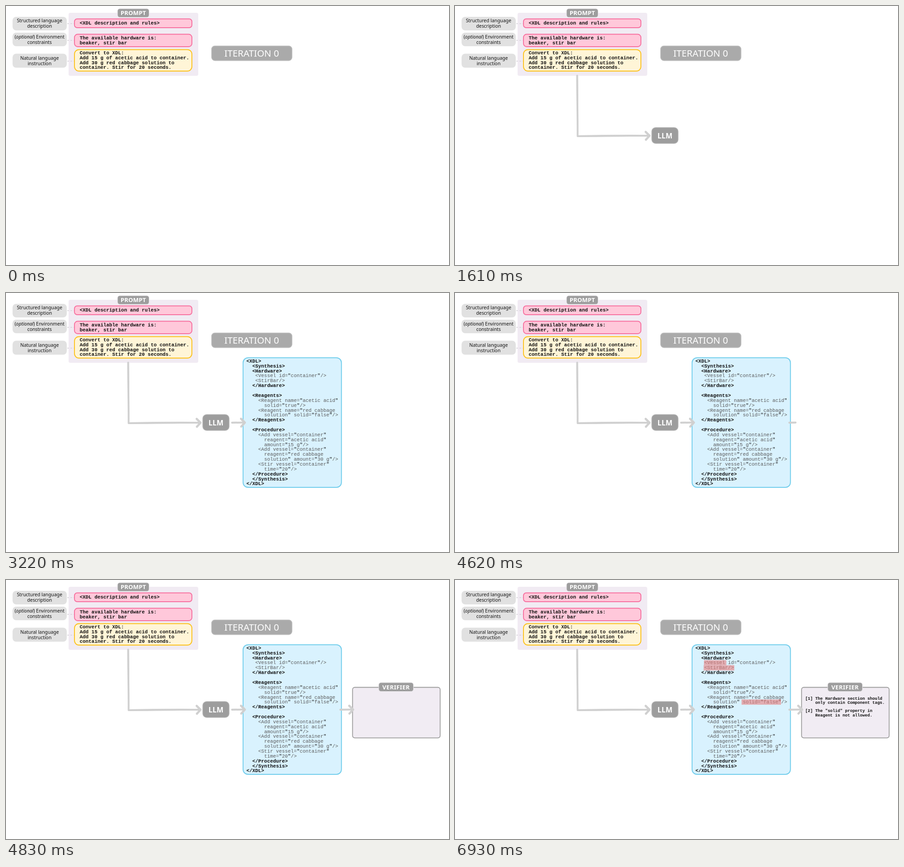
An HTML page that plays this animation: 977x573 px, repeating every 8 s.

```html
<!DOCTYPE html>
<html lang="en">
<head>
<meta charset="utf-8">
<title>Prompt, model and verifier loop</title>
<style>
  html, body { margin: 0; width: 100%; height: 100%; overflow: hidden; background: #fff; }
  svg { display: block; width: 977px; height: 573px; }
  .sans { font-family: "Noto Sans", "Open Sans", sans-serif; }
  .label { font-size: 10.4px; font-weight: 500; fill: #111; text-anchor: middle; }
  .tag { font-weight: 600; fill: #fff; text-anchor: middle; }
  .mono { font-family: "Liberation Mono", "Courier New", monospace; font-size: 10.88px; fill: #5a5a5a; white-space: pre; }
  .bold { font-weight: 700; fill: #111; }
  .quote { fill: #111; }
  .small { font-size: 9.15px; }
  .arrow path { fill: none; stroke: #d0d0d0; stroke-linecap: round; stroke-linejoin: round; }
</style>
</head>
<body>
<svg id="stage" viewBox="0 0 977 573" xmlns="http://www.w3.org/2000/svg"></svg>
<script>
const LOOP = 8000, STEP = 70;

const esc = s => s.replace(/&/g, '&amp;').replace(/</g, '&lt;').replace(/>/g, '&gt;');

const rect = (x, y, w, h, r, fill, stroke = 'none', sw = 0) =>
  `<rect x="${x}" y="${y}" width="${w}" height="${h}" rx="${r}" fill="${fill}" stroke="${stroke}" stroke-width="${sw}"/>`;

const text = (cls, x, y, html, extra = '') =>
  `<text class="${cls}" x="${x}" y="${y}" ${extra}>${html}</text>`;

const group = (id, html, cls = '') => `<g id="${id}" class="${cls}">${html}</g>`;

const mono = (x, y, lines, pitch, cls = '') =>
  lines.map((s, i) => text('mono bold ' + cls, x, y + i * pitch, esc(s))).join('');

function label(y, h, lines, base) {
  return rect(14.5, y, 119.5, h, 8, '#e1e1e1') +
    lines.map((s, i) => text('sans label', 74, base + i * 12.4, s)).join('');
}

const dash = y =>
  `<path d="M135 ${y}H150" stroke="#d8d3da" stroke-width="1.4" stroke-dasharray="4 3"/>`;

// Grey title plate with a pale rim
const plate = (x, y, w, h, name, spacing) =>
  rect(x - 1, y - 1, w + 2, h + 2, 5.5, '#e3e1e4') + rect(x, y, w, h, 4.5, '#9d9d9d') +
  text('sans tag', x + w / 2, y + h / 2 + 4.8, name, `font-size="13.2" letter-spacing="${spacing}"`);

function promptPanel() {
  return rect(138, 15, 286, 139.5, 4, '#f1ebf3') +
    label(24, 30, ['Structured language', 'description'], 35.7) +
    label(59, 30, ['(<tspan font-style="italic">optional</tspan>) Environment', 'constraints'], 71.7) +
    label(105.5, 31, ['Natural language', 'instruction'], 118.7) +
    [39, 76, 122].map(dash).join('') +
    rect(151, 28.5, 259, 19.5, 6, '#ffc8da', '#f7709f', 1.9) +
    rect(151, 62.5, 259, 27.5, 7, '#ffc8da', '#f7709f', 1.9) +
    rect(151, 96.5, 259, 47.5, 10, '#fff5d7', '#fcc21b', 1.9) +
    mono(162.5, 41.3, ['<XDL description and rules>'], 0) +
    mono(162.5, 74.4, ['The available hardware is:', 'beaker, stir bar'], 10.8) +
    mono(162.5, 107, ['Convert to XDL:', 'Add 15 g of acetic acid to container.',
      'Add 30 g red cabbage solution to', 'container. Stir for 20 seconds.'], 10.8) +
    plate(246.5, 6.5, 68.5, 18, 'PROMPT', 0);
}

const listing = `<XDL>
  <Synthesis>
  <Hardware>
   <Vessel id="container"/>
   <StirBar/>
  </Hardware>

  <Reagents>
    <Reagent name="acetic acid"
      solid="true"/>
    <Reagent name="red cabbage
      solution" solid="false"/>
  </Reagents>

  <Procedure>
    <Add vessel="container"
      reagent="acetic acid"
      amount="15 g"/>
    <Add vessel="container"
      reagent="red cabbage
      solution" amount="30 g"/>
    <Stir vessel="container"
      time="20"/>
  </Procedure>
  </Synthesis>
</XDL>`.split('\n');

function codeLine(line, i) {
  const body = line.trim(), indent = line.length - body.length;
  const bold = /^<\/?(XDL|Synthesis|Hardware|Reagents|Procedure)>$/.test(body);
  const html = esc(body).replace(/"/g, '<tspan class="quote">"</tspan>');
  return text(bold ? 'mono bold' : 'mono', 530.2 + indent * 6.53, 153.9 + i * 10.86, html);
}

const code = () =>
  rect(522.8, 143.3, 217, 286.7, 11, '#d9f2fe', '#70cdec', 1.9) + listing.map(codeLine).join('');

const mark = (x, y, w, h) => rect(x, y, w, h, 0, 'rgba(233,128,128,.6)');

const note = (y, lines) => mono(772.6, y, lines, 9.4, 'small');

// The shaft is drawn twice with a slight wobble, for a hand-made look
function arrow(id, shafts, tipX, tipY) {
  const shaft = shafts.map((d, i) =>
    `<path class="shaft" d="${d}" pathLength="100" stroke-width="${i ? 2.6 : 4}"/>`).join('');
  const head = `<path class="head" d="M${tipX - 8.5} ${tipY - 8.5}L${tipX} ${tipY}L${tipX - 8} ${tipY + 8.8}" stroke-width="4.8"/>`;
  return group(id, shaft + head, 'arrow');
}

const shortArrow = (id, x) =>
  arrow(id, [`M${x} 286.7L${x + 28} 286.5`, `M${x} 287.6L${x + 28} 286.8`], x + 28.3, 286.7);

const stage = document.getElementById('stage');
stage.innerHTML =
  promptPanel() +
  rect(453.6, 88.6, 177, 32, 7, '#aaaaaa', '#b9b9b9', 1.6) +
  text('sans', 541.8, 111.8, 'ITERATION 0', 'font-size="20.4" font-weight="500" fill="#fff" text-anchor="middle"') +
  group('llm', rect(434, 269, 58, 35, 8.5, '#9d9d9d', '#b2b2b2', 1.4) +
    text('sans tag', 463, 292.6, 'LLM', 'font-size="16"')) +
  group('code', code()) +
  group('check', rect(764.3, 237.5, 193.2, 111.8, 5, '#f1ecf3', '#9d9d9d', 1.8) +
    plate(822.5, 227.5, 75.5, 18.5, 'VERIFIER', 0.3)) +
  arrow('toModel', ['M269.4 154C269.2 200 270.8 245 270.4 288C320 287 380 286.6 427 287',
    'M270 154C271.2 200 269.8 245 270.8 288.4C325 288.6 380 287.6 427 287.2'], 429, 287) +
  shortArrow('toCode', 498.5) +
  shortArrow('toCheck', 737.2) +
  group('first', mark(549, 177.3, 49.5, 11.2) + mark(548.3, 188.5, 67.7, 11.7) +
    note(264.6, ['[1] The Hardware section should', '    only contain Component tags.'])) +
  group('second', mark(632, 264.2, 87, 11.7) +
    note(292.1, ['[2] The "solid" property in', '    Reagent is not allowed.']));

const el = id => document.getElementById(id);
const cues = { llm: 1610, code: 3220, check: 4830, first: 5320, second: 6930 };
const draws = { toModel: 1260, toCode: 2940, toCheck: 4620 };

const show = (node, on) => node.setAttribute('visibility', on ? 'visible' : 'hidden');

function render(t) {
  for (const id in cues) show(el(id), t >= cues[id]);
  for (const id in draws) {
    const g = el(id);
    const k = Math.max(0, Math.min(1, (Math.floor((t - draws[id]) / STEP) + 1) / 2));
    show(g, k > 0);
    g.querySelectorAll('.shaft').forEach(p =>
      p.setAttribute('stroke-dasharray', k < 1 ? `${k * 100} 200` : 'none'));
    g.querySelector('.head').setAttribute('visibility', k === 1 ? 'visible' : 'hidden');
  }
}

const begin = performance.now();
function tick() {
  render((performance.now() - begin) % LOOP);
  requestAnimationFrame(tick);
}
render(0);
requestAnimationFrame(tick);
</script>
</body>
</html>
```
